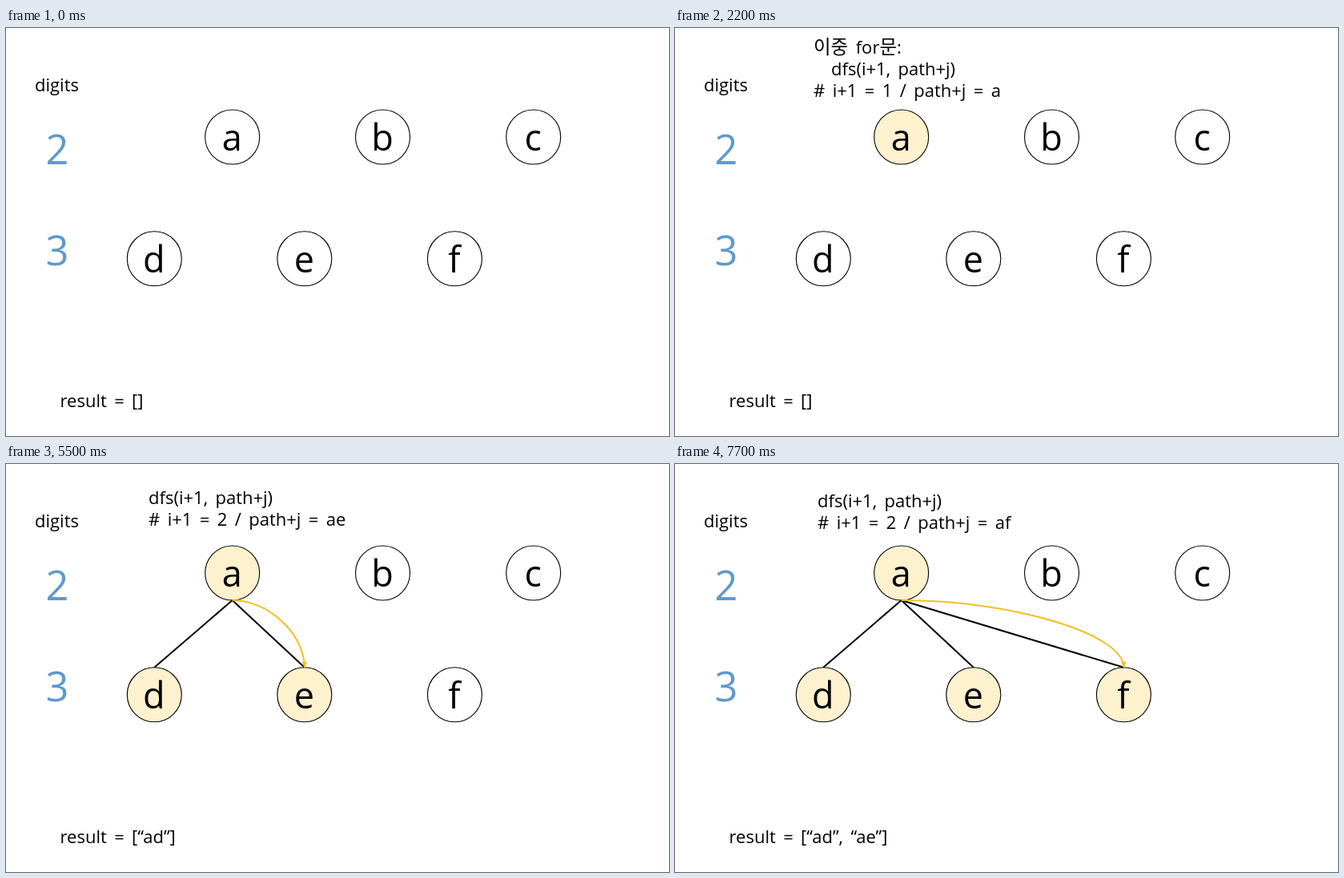
An HTML page for the animation above (8 s loop, 828 by 509 pixels).

```html
<!DOCTYPE html>
<html lang="ko">
<head>
<meta charset="utf-8">
<style>
  html, body { margin: 0; width: 100%; height: 100%; overflow: hidden; background: #fff; }
  svg { display: block; width: 828px; height: 509px; }
  text { font: 22px "Open Sans", "Noto Sans CJK KR", "Noto Sans CJK", sans-serif; word-spacing: 3.7px; white-space: pre; }
  .hangul { font-size: 23.5px; }
  .digit { font-size: 50.5px; fill: #5e9acb; text-anchor: middle; }
  .letter { font-size: 45px; text-anchor: middle; }
  circle { fill: none; stroke: #000; stroke-width: 1.1; }
  .visited { fill: #fdf1ce; }
  .edge { stroke: #000; stroke-width: 2; }
  .arrow { fill: none; stroke: #f2c024; stroke-width: 2; }
  .head { fill: #f2c024; }
</style>
</head>
<body>
<svg viewBox="0 0 828 509"></svg>
<script>
const STEP = 1100, LOOP = 8000, RADIUS = 34, LINE = 26.8;
const nodes = {
  a: [282.7, 136], b: [470.5, 136], c: [658.7, 136],
  d: [185.3, 287.8], e: [372.8, 287.8], f: [560.4, 287.8]
};

const text = (x, y, content, cls = "") =>
  `<text x="${x}" y="${y}" class="${cls}">${content.replace(/[가-힣]+/g, '<tspan class="hangul">$&</tspan>')}</text>`;

// Each line is [indent, content].
const block = (x, y, lines) =>
  lines.map(([indent, content], i) => text(x + indent, y + i * LINE, content)).join("");

const call = (x, y, path) => block(x, y, [[0, "dfs(i+1, path+j)"], [0, `# i+1 = 2 / path+j = ${path}`]]);
const append = (x, y, path) =>
  block(x, y, [[0, "if 조건문:"], [32, `result.append(“${path}”)`], [32, "return"]]);

// Edges join the bottom of the upper row to the top of the lower row.
const port = name => {
  const [x, y] = nodes[name];
  return [x, y + (y < 200 ? RADIUS : -RADIUS)];
};

function edge(child) {
  const [x1, y1] = port("a"), [x2, y2] = port(child);
  return `<line class="edge" x1="${x1}" y1="${y1}" x2="${x2}" y2="${y2}"/>`;
}

function arrow([from, to]) {
  const [x1, y1] = port(from), [x2, y2] = port(to);
  const back = y2 > y1 ? -7 : 7;
  const curve = `M${x1} ${y1}C${(x1 + x2) / 2} ${y1} ${x2} ${(y1 + y2) / 2} ${x2} ${y2}`;
  return `<path class="arrow" d="${curve}"/><path class="head" d="M${x2} ${y2}l-3.5 ${back}h7z"/>`;
}

const steps = [
  {},
  { note: text(174, 86, "dfs(0, “”)") },
  { visited: "a", note: block(173, 32, [[0, "이중 for문:"], [22, "dfs(i+1, path+j)"], [0, "# i+1 = 1 / path+j = a"]]) },
  { visited: "ad", move: "ad", note: call(300, 203, "ad") },
  { visited: "ad", move: "da", result: "“ad”", note: append(73, 360, "ad") },
  { visited: "ade", move: "ae", result: "“ad”", note: call(178, 50, "ae") },
  { visited: "ade", move: "ea", result: "“ad”, “ae”", note: append(257, 354, "ae") },
  { visited: "adef", move: "af", result: "“ad”, “ae”", note: call(178, 54, "af") }
];

function render({ visited = "", move, result = "", note = "" }) {
  const circles = Object.entries(nodes).map(([name, [x, y]]) =>
    `<circle cx="${x}" cy="${y}" r="${RADIUS}" class="${visited.includes(name) ? "visited" : ""}"/>` +
    text(x - 0.5, y + 17, name, "letter")).join("");
  return text(36, 79, "digits") + text(64, 170, "2", "digit") + text(64, 295.5, "3", "digit") +
    circles + [...visited.slice(1)].map(edge).join("") + (move ? arrow(move) : "") +
    note + text(67.5, 473, `result = [${result}]`);
}

const stage = document.querySelector("svg");
let shown = -1;
function tick() {
  const index = Math.floor(performance.now() % LOOP / STEP);
  if (index !== shown) stage.innerHTML = render(steps[shown = index]);
  requestAnimationFrame(tick);
}
tick();
</script>
</body>
</html>
```
